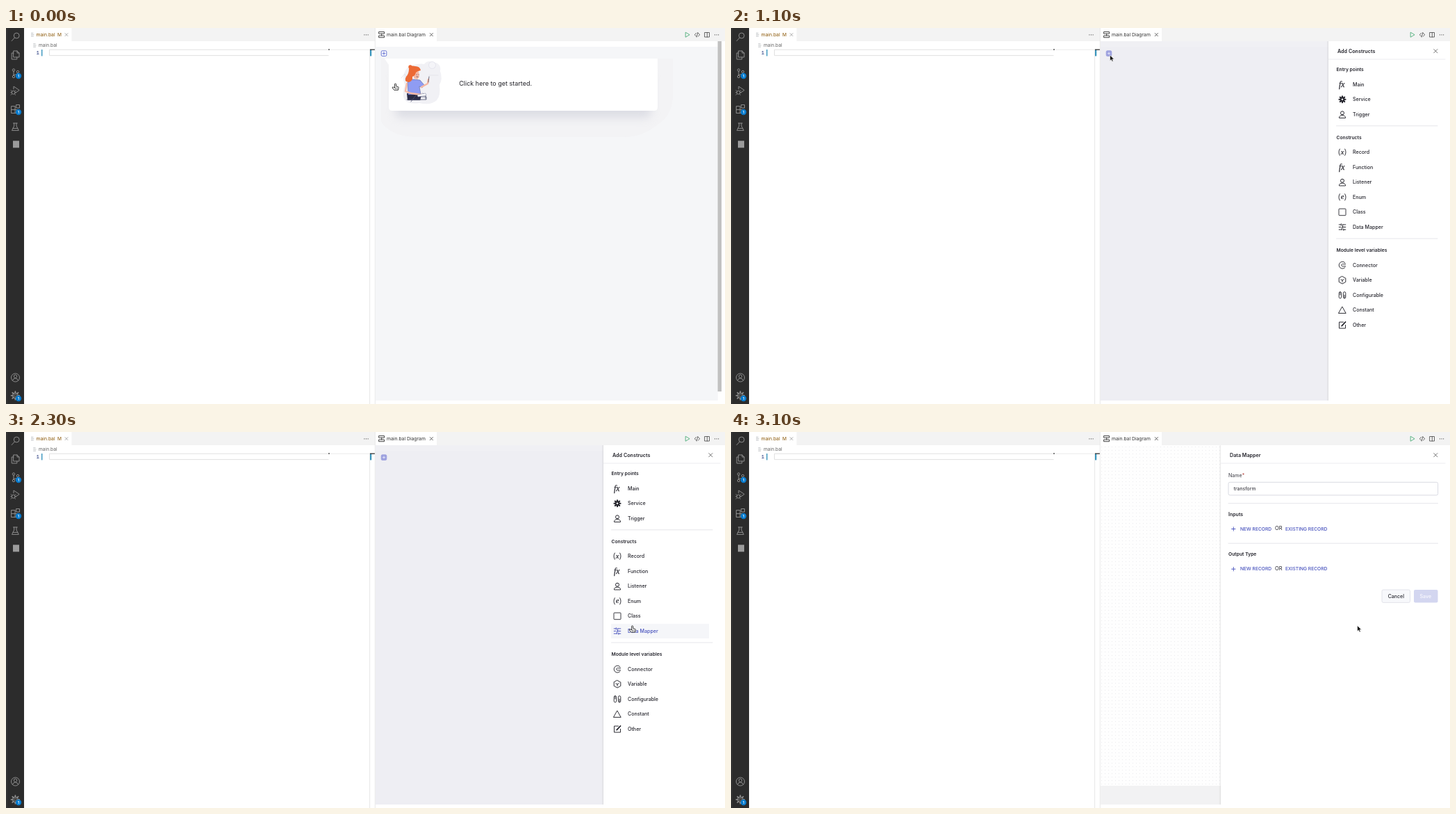
Recreate the animation shown at these times as an HTML page. Size 1035 px wide and 541 px high, loop 3.5 s.

```html
<!DOCTYPE html>
<html lang="en">
<head>
<meta charset="utf-8">
<title>Add a data mapper</title>
<style>
html, body { margin: 0; width: 100%; height: 100%; overflow: hidden; background: #fff; }
svg { display: block; width: 1035px; height: 541px; font-family: Inter, "Open Sans", sans-serif; }
.line { fill: none; stroke-linecap: round; stroke-linejoin: round; }
.serif { font-family: "Liberation Serif", serif; font-style: italic; }
.mono { font-family: "Liberation Mono", monospace; }
</style>
</head>
<body>
<svg id="stage" viewBox="0 0 1035 541" xmlns="http://www.w3.org/2000/svg"></svg>
<script>
const INK = '#24242c', BLUE = '#4651bd', LOOP = 3500, STEP = 100;
const stage = document.getElementById('stage');

const rect = (x, y, w, h, fill, extra = '') =>
  `<rect x="${x}" y="${y}" width="${w}" height="${h}" fill="${fill}" ${extra}/>`;
const circle = (x, y, r, fill, extra = '') =>
  `<circle cx="${x}" cy="${y}" r="${r}" fill="${fill}" ${extra}/>`;
const line = (d, color, width = 1, extra = '') =>
  `<path class="line" d="${d}" stroke="${color}" stroke-width="${width}" ${extra}/>`;
const shape = (d, fill, extra = '') => `<path d="${d}" fill="${fill}" ${extra}/>`;
const text = (x, cy, s, size, fill = INK, weight = 400, extra = '') =>
  `<text x="${x}" y="${cy + size * 0.36}" font-size="${size}" fill="${fill}" font-weight="${weight}" ${extra}>${s}</text>`;
const at = (x, y, body, extra = '') => `<g transform="translate(${x} ${y})" ${extra}>${body}</g>`;
const cross = (x, y, r, color, width = 0.8) =>
  line(`M${x - r} ${y - r}l${2 * r} ${2 * r}m0 ${-2 * r}l${-2 * r} ${2 * r}`, color, width);
const dots = (x, y) => [-2.6, 0, 2.6].map(d => circle(x + d, y, 0.65, '#424242')).join('');
const rule = (x1, x2, y) => line(`M${x1} ${y}H${x2}`, '#dfdfe5', 0.8);
const badge = (x, y) => circle(x, y, 4.2, '#087bcd') +
  text(x, y, '1', 5.4, '#fff', 600, 'text-anchor="middle"');
const fileIcon = (x, y) => line(`M${x} ${y - 2.2}h2.6m-2.6 2.2h3.4m-3.4 2.2h3`, '#a4a9ad', 0.7);
const gear = (r, teeth, width, color, hole) => {
  let d = '';
  for (let i = 0; i < teeth; i++) {
    const a = i * 2 * Math.PI / teeth, c = Math.cos(a), s = Math.sin(a);
    d += `M${c * r * 0.75} ${s * r * 0.75}L${c * r * 1.25} ${s * r * 1.25}`;
  }
  return line(d, color, width) + circle(0, 0, r * 0.85, hole ? 'none' : color, `stroke="${color}" stroke-width="1"`) +
    circle(0, 0, r * 0.36, hole ? 'none' : '#fff', hole ? `stroke="${color}" stroke-width=".8"` : '');
};

function activityBar() {
  const c = '#8c8c8c';
  const icon = d => line(d, c, 1);
  return rect(0, 0, 26, 541, '#2c2c2c') + rect(0.8, 0, 0.6, 541, '#454545') +
    circle(15.2, 11, 3.9, 'none', `stroke="${c}"`) + icon('M12.4 14L8.2 18.6') +
    icon('M11 33h5l3 3v6h-8zM16 33v3h3M11 36H8.2v9h7.6v-3') +
    [[11, 60.5], [11, 70], [17, 63]].map(p => circle(...p, 1.7, 'none', `stroke="${c}"`)).join('') +
    icon('M11 62.2v6.1M17 64.7q0 2.3-6 2.8') + badge(18, 69) +
    icon('M11 88v-4l8.2 5.5-5.4 3.6') + circle(10.6, 92.8, 2.4, 'none', `stroke="${c}"`) +
    icon('M8.2 90.6l-1-1m-.4 3.2h1.4m-1 3.4l1.2-1.2m4.6-4.4l1-1m-.8 3.2h1.4m-1 3.4l-1.2-1.2') +
    icon('M8 112.5h5v10H8zM8 117.5h10v5H8M15 110.5h4.5v4.5H15z') + badge(18, 121) +
    icon('M10.5 137h5.8M11.7 137v4l-3.2 6.4h9.8L15 141v-4M10 144.4h6.8') +
    rect(10, 162.3, 9, 10, '#9b9b9b') +
    circle(13.5, 503, 6, 'none', `stroke="${c}"`) + circle(13.5, 501.2, 2.2, 'none', `stroke="${c}"`) +
    icon('M9.5 507q1-3 4-3t4 3') + at(13.4, 528.8, gear(4.7, 8, 1.8, c, true)) + badge(18, 533);
}

function editor() {
  return rect(26, 0, 1009, 19, '#f3f3f3') + rect(26, 0, 68.5, 19, '#fff') +
    fileIcon(36.4, 9.6) + text(43.5, 9.5, 'main.bal', 6.8, '#895503') +
    text(74, 9.5, 'M', 6.6, '#895503') + cross(87, 9.6, 2, '#8a8a8a', 0.7) + dots(518.5, 9.8) +
    fileIcon(39.6, 25) + text(47, 25, 'main.bal', 6.7, '#616161') +
    text(43.6, 35.5, '1', 7.4, '#0b216f', 400, 'class="mono"') + rect(51, 31, 1.4, 9.4, '#3995bd') +
    line('M464 31.2H62.5V39.6H464', '#dedede', 0.9) +
    line('M467 31.2H524', '#e2e2e2', 0.7) + rect(464, 30.4, 2, 1.2, '#333') +
    line('M523.6 31V541', '#dfdfdf', 0.8) + rect(524, 31, 2.2, 9.4, '#3995bd') +
    rect(524, 30.5, 7, 1.3, '#333');
}

function diagramTab() {
  return rect(531, 0, 89, 19, '#fff') + line('M531.3 0V541', '#e3e3e3', 0.8) +
    line('M537 5.5h7.5v2.7H537zM537 11h7.5v2.7H537zM540.7 8.2V11', '#333', 0.9) +
    text(548, 9.5, 'main.bal Diagram', 6.8, '#333') + cross(612.4, 9.6, 2.1, '#444') +
    line('M978.5 6.4l5.6 3.3-5.6 3.3z', '#4dae7a', 0.9) +
    line('M993.6 7.4l-2.4 2.3 2.4 2.3M996.4 7.4l2.4 2.3-2.4 2.3M995.8 6.4l-1.6 6.6', '#424242', 0.8) +
    line('M1006 6.5h6.5v6.5H1006zM1009.3 6.5V13', '#424242', 0.8) + dots(1023, 9.8);
}

function person() {
  const skin = '#f6b9a5', dark = '#292a45', hair = '#ec6a35', shirt = '#8f9cf3';
  return shape('M578 57q15-7 24-5 4-6 13-3 12 2 10 13 4 11-1 20 2 15-4 22-9 8-25 4-20 3-23-9-1-9 2-17-5-15 4-25z', '#f1f1f5') +
    circle(613.5, 53.5, 5, '#f4f4f8', 'stroke="#dfdfe9" stroke-width=".7"') +
    line('M609 68h13M569 72l5-6 3 7', '#e1e1e8', 0.8) +
    shape('M577 94l15-2 6 5-2 7h-18z', dark) +
    line('M577 103h20M590 97l-7 9M600 94l4 3v5M593 99h12v4h-9', '#50536f', 0.8) +
    shape('M578 78q4-5 10-4l8 1 6 7-3 4-4-2 2 11-18 1z', shirt, 'stroke="#4c5482" stroke-width=".5"') +
    line('M598 85l9-5 1-6', skin, 2.5) + line('M608 78l1-8', '#4c4f63', 0.8) +
    line('M577 80l-2 11 8 3 15 2', skin, 2.4) +
    shape('M587 64l7-2 1 8-3 4-5-2z', skin) +
    shape('M580 59q2-6 9-4 7 0 8 6-5 1-7 3-1 5-5 6 1 6-5 8-8-1-4-8 4-4 4-11z', hair) +
    circle(582, 56, 2.7, hair) + line('M591 67l.4 0M594 67l.3 0M591 70l2 .4', dark, 0.6) +
    shape('M592 96l12-2 1 3-12 2z', '#fff', 'stroke="#777b96" stroke-width=".5"');
}

function startView() {
  return rect(531.7, 27, 493, 509, '#f5f6f8') + rect(1024.5, 19, 5.5, 504, '#c1c1c1') +
    shape('M540 44H960V100Q958 127 938 139Q916 157 890 157H590Q564 156 551 146Q540 139 540 133Z', '#f3f3f5') +
    `<g clip-path="url(#below)">${rect(560, 62, 369, 67, '#b9bbca', 'rx="8" opacity=".4" filter="url(#blur)"')}</g>` +
    shape('M551 44H938V114Q938 119 933 119H556Q551 119 551 114V53L545 44Z', '#fff') +
    person() + text(652.3, 80.2, 'Click here to get started.', 9, '#222228');
}

const plus = (fill, color) => rect(540.2, 32.8, 7.6, 7.6, fill, `rx="1.5" stroke="${color}" stroke-width=".9"`);
const startButton = () => plus('#fff', '#5967cf') + line('M544 34.7v3.8m-1.9-1.9h3.8', '#5967cf', 0.9);
const dimView = () => rect(531.7, 19, 498.3, 517, '#eeeef3') + rect(531.7, 19, 498.3, 8, '#f0f0f4') +
  plus('#9da1df', '#9da1df') + line('M544 35v3.2m-1.6-1.6h3.2', '#e6e7fa', 0.9);
const gridView = () => rect(531.7, 19, 498.3, 490, 'url(#grid)') + rect(531.7, 509, 498.3, 27, '#f2f2f3');

const icons = {
  fx: '<text class="serif" x="-5" y="3.4" font-size="11.5" fill="currentColor" stroke="currentColor" stroke-width=".25">fx</text>',
  record: letterIcon('x'), enum: letterIcon('e'),
  gear: gear(3.6, 8, 2.2, 'currentColor', false),
  user: circle(0, -2, 2.5, 'none', 'stroke="currentColor"') + stroke('M-4.5 4.8v-1q1-2.5 4.5-2.5t4.5 2.5v1z'),
  box: rect(-5, -4.8, 10, 9.6, 'none', 'rx=".8" stroke="currentColor" stroke-width=".9"'),
  mapper: stroke('M-4.8-3.5h3.2m2 0h4.4M-4.8 0h2.5m4.5 0h2.6M-4.8 3.6h4.4m2.2 0h3M-1.6-4.7v2.4M.4-3.5V0M-.4 3.6V0h3M1.8 2.4v2.4'),
  connector: stroke('M3.8-3.5A5 5 0 1 0 3.8 3.5M4.7-1.5H1.2A1.7 1.7 0 1 0 1.2 1.6H4.7'),
  variable: stroke('M0-5.3l4.8 2.6v5.4L0 5.3l-4.8-2.6v-5.4zM-2.2-1.2L0 .4l2.2-1.6M0 .4v2.2'),
  config: rect(-4.8, -4.6, 3.4, 9.2, 'none', 'rx="1.7" stroke="currentColor" stroke-width=".9"') +
    rect(1.4, -4.6, 3.4, 9.2, 'none', 'rx="1.7" stroke="currentColor" stroke-width=".9"') +
    stroke('M-3.1-4.5v4M3.1 0v4.5'),
  triangle: stroke('M0-4.6L5.2 4.6H-5.2z'),
  edit: stroke('M1.5-4.3h-6v9h9V0') + line('M-.8 1.2L4.5-4.4', 'currentColor', 1.8)
};
function stroke(d) { return line(d, 'currentColor', 0.95); }
function letterIcon(letter) {
  return `<text class="serif" y="3" font-size="10.5" text-anchor="middle" fill="currentColor" stroke="currentColor" stroke-width=".2">${letter}</text>` +
    stroke('M-3.7-4.6q-2.8 4.6 0 9.2M3.7-4.6q2.8 4.6 0 9.2');
}

const sections = [
  ['Entry points', 60, [['Main', 'fx'], ['Service', 'gear'], ['Trigger', 'user']]],
  ['Constructs', 157.5, [['Record', 'record'], ['Function', 'fx'], ['Listener', 'user'],
    ['Enum', 'enum'], ['Class', 'box'], ['Data Mapper', 'mapper']]],
  ['Module level variables', 320, [['Connector', 'connector'], ['Variable', 'variable'],
    ['Configurable', 'config'], ['Constant', 'triangle'], ['Other', 'edit']]]
];

const panelBase = (x, title) =>
  rect(x, 19, 1032 - x, 517, '#777', 'opacity=".35" filter="url(#edge)"') +
  rect(x, 19, 1030 - x, 517, '#fff') + text(x + 13, 33, title, 7.2, INK, 600) +
  cross(1014.3, 33.2, 2.6, '#555', 0.8) + line(`M${x} 45H1028`, '#e6e6eb', 0.8);

function constructsPanel() {
  let out = panelBase(860, 'Add Constructs') + rect(871, 276, 141, 21, '#f5f6f9', 'id="hover"');
  for (const [title, y, items] of sections) {
    out += text(871.5, y, title, 6.75, INK, 600);
    items.forEach(([label, icon], i) => {
      const cy = y + 21.2 + i * 21.55;
      const id = icon === 'mapper' ? 'id="mapper"' : '';
      out += `<g ${id} color="${INK}">${at(880, cy, icons[icon])}${text(895, cy, label, 7.1, 'currentColor', 450)}</g>`;
    });
  }
  return out + rule(871.5, 1017, 140.8) + rule(871.5, 1017, 303);
}

const recordRow = y => line(`M720.6 ${y + 0.2}h5.4m-2.7-2.7v5.4`, BLUE, 0.9) +
  text(733, y, 'NEW RECORD', 6.7, BLUE, 500) + text(783, y - 0.7, 'OR', 7.5) +
  text(798, y, 'EXISTING RECORD', 6.7, BLUE, 500);

function formPanel() {
  return panelBase(705, 'Data Mapper') +
    text(716, 62.6, 'Name<tspan fill="#b5443d">*</tspan>', 7.1, '#3b3b43') +
    rect(716, 72.3, 301.6, 18.6, '#fff', 'rx="2.2" stroke="#d5d6df" stroke-width=".9"') +
    text(723.7, 81.7, 'transform', 6.95) + rule(716, 1017.5, 102.7) +
    text(716, 118.2, 'Inputs', 7, INK, 600) + recordRow(139.3) + rule(716, 1017.5, 160.2) +
    text(716, 175.8, 'Output Type', 6.75, INK, 600) + recordRow(197) +
    rect(937, 227, 40.5, 18.4, '#f7f8fb', 'rx="2" stroke="#dcdde6" stroke-width=".8"') +
    text(957.3, 236.3, 'Cancel', 7, INK, 500, 'text-anchor="middle"') +
    rect(983, 227, 34.5, 18.6, '#d3d6f0', 'rx="2"') +
    text(999.8, 236.3, 'Save', 7, '#f6f6fd', 600, 'text-anchor="middle"');
}

const handCursor = shape('M-1 .7Q0-.5 1 .7V4L4 4.7Q4.8 5 4.6 6.3L4 9.5H-1.8L-4.3 6.3Q-4.6 5 -3.1 5.2L-1 6.4Z',
  '#fff', 'stroke="#222" stroke-width=".9" stroke-linejoin="round"') + line('M1.2 6v2M2.7 6v2M-.2 6v2', '#333', 0.5);
const arrowCursor = shape('M0 0V8.2L1.9 6.4 3.2 9.3 4.7 8.6 3.4 5.9H6Z', '#111', 'stroke="#fff" stroke-width=".6"');

const layer = (id, body) => `<g id="${id}">${body}</g>`;
stage.innerHTML = `<defs>
  <pattern id="grid" x="531" y="19" width="5" height="5" patternUnits="userSpaceOnUse">
    ${rect(0, 0, 5, 5, '#fefefe') + circle(2.5, 2.5, 0.5, '#e4e4e8')}</pattern>
  <clipPath id="view">${rect(531.7, 19, 498.3, 517, '#fff')}</clipPath>
  <clipPath id="below">${rect(531, 44, 493, 150, '#fff')}</clipPath>
  <filter id="blur" x="-20%" y="-80%" width="140%" height="260%"><feGaussianBlur stdDeviation="7"/></filter>
  <filter id="edge" x="-10%" width="120%"><feGaussianBlur stdDeviation="1.8 0"/></filter></defs>` +
  rect(0, 0, 1035, 541, '#fff') + editor() + diagramTab() + activityBar() +
  `<g clip-path="url(#view)">` +
  layer('start', startView() + startButton()) + layer('dim', dimView()) + layer('gridView', gridView()) +
  layer('constructs', constructsPanel()) + layer('form', formPanel()) + '</g>' +
  circle(0, 0, 15.8, '#fff', 'id="ring" fill-opacity=".45" stroke="#111" stroke-width="1.6"') +
  layer('hand', handCursor) + layer('arrow', arrowCursor);

const el = id => document.getElementById(id);
const show = (id, on) => el(id).setAttribute('visibility', on ? 'visible' : 'hidden');
const move = (id, x, y) => el(id).setAttribute('transform', `translate(${x} ${y})`);

const pointerPath = [
  [0, 560.5, 79.8], [100, 573, 85], [200, 589, 90], [300, 577, 74], [400, 557, 50], [500, 545.5, 39],
  [1200, 545.5, 39], [1300, 573, 66], [1400, 650, 145], [1500, 732, 228], [1600, 797.6, 273],
  [1700, 872, 277], [1800, 901.6, 278.6], [LOOP, 901.6, 278.6]
];
function pointerAt(t) {
  const i = pointerPath.findIndex(p => p[0] > t);
  const [t0, x0, y0] = pointerPath[i - 1], [t1, x1, y1] = pointerPath[i];
  const k = (t - t0) / (t1 - t0);
  return [x0 + (x1 - x0) * k, y0 + (y1 - y0) * k];
}

// Drawer easing: cubic-bezier(0, 0, .2, 1) over 225 ms.
function slide(t, start) {
  const x = Math.min(1, Math.max(0, (t - start) / 225));
  let lo = 0, hi = 1;
  for (let i = 0; i < 24; i++) {
    const s = (lo + hi) / 2;
    if (0.6 * (1 - s) * s * s + s ** 3 < x) lo = s; else hi = s;
  }
  return x === 1 ? 1 : 3 * lo * lo - 2 * lo ** 3;
}

function render(t) {
  const formOpen = t >= 2440, dimmed = t >= 800 && !formOpen;
  show('start', t < 800);
  show('dim', dimmed);
  show('gridView', formOpen);
  show('constructs', t > 814 && !formOpen);
  show('form', formOpen);
  move('constructs', 170 * (1 - slide(t, 814)), 0);
  move('form', 325 * (1 - slide(t, 2443)), 0);

  const hovered = t >= 1800 && !formOpen;
  show('hover', hovered);
  el('mapper').setAttribute('color', hovered ? BLUE : INK);

  const [x, y] = pointerAt(t);
  const pointing = t < 800 || (t >= 1900 && t < 2400);
  show('hand', pointing);
  show('arrow', !pointing);
  move('hand', x, y);
  move('arrow', x, y);
  show('ring', (t >= 600 && t < 700) || (t >= 2200 && t < 2300));
  move('ring', x, y + 0.8);
}

let origin;
function tick(now) {
  origin ??= now;
  render(Math.floor(((now - origin) % LOOP) / STEP) * STEP);
  requestAnimationFrame(tick);
}
render(0);
requestAnimationFrame(tick);
</script>
</body>
</html>
```
